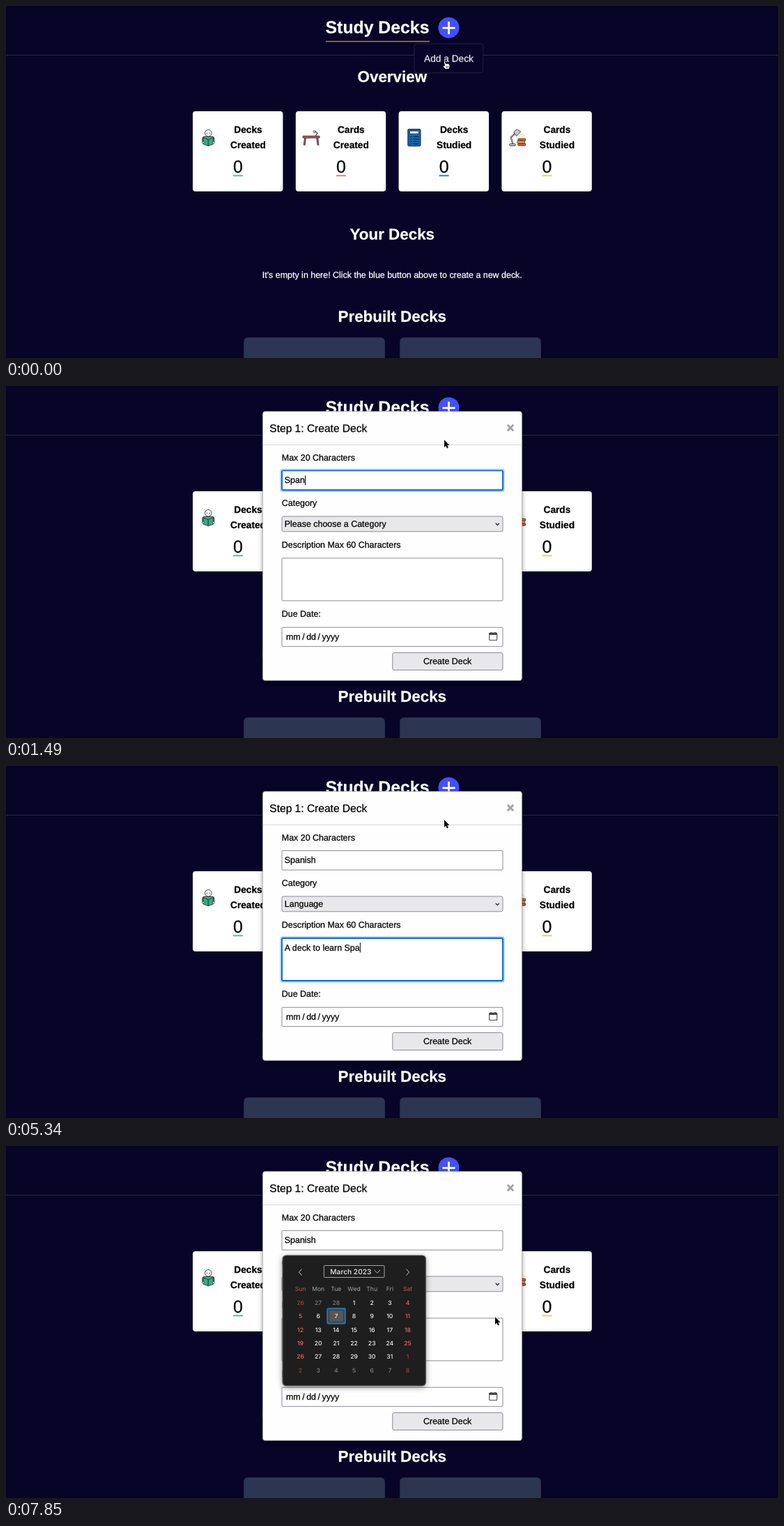
Write an HTML page with a canvas that moves like this. It is 1108 px wide and 505 px high and loops after 8 s.

```html
<!DOCTYPE html>
<html lang="en">
<head>
<meta charset="utf-8">
<title>Study Decks</title>
<style>
html, body { margin: 0; width: 100%; height: 100%; overflow: hidden; background: #070428; }
canvas { display: block; }
</style>
</head>
<body>
<canvas id="stage" width="1108" height="505"></canvas>
<script>
const W = 1108, H = 505, LOOP = 8000;
const ARIAL = '"Liberation Sans", Arial, sans-serif';
const INTER = 'Inter, sans-serif';
const BG = '#070428', BASE = 12.45, INK = '#35323c';
const screen = document.getElementById('stage').getContext('2d');
const layer = document.createElement('canvas');
layer.width = W;
layer.height = H;
const sheet = layer.getContext('2d');
let c = screen;

// The screen advances in even beats; every event falls on one.
const BEAT = 148.2, LEAD = 5;
const AT = { open: 3, name: 7, select: 13, menu: 15, hover: 16, picked: 20, note: 21,
  write: 23, finish: 36, date: 43, blur: 50, calendar: 52, drift: 53 };

const clamp = (v, lo, hi) => Math.min(hi, Math.max(lo, v));

function typed(str, beat, first, rate, lag = 0) {
  const keys = beat < first ? 0 : Math.floor((beat - first + 1) * rate - lag);
  return str.slice(0, keys);
}

// CSS "ease": cubic-bezier(.25, .1, .25, 1)
function ease(x) {
  const curve = (a, b, u) => 3 * a * u * (1 - u) ** 2 + 3 * b * u * u * (1 - u) + u ** 3;
  let lo = 0, hi = 1;
  for (let i = 0; i < 24; i++) {
    const mid = (lo + hi) / 2;
    if (curve(.25, .25, mid) < x) lo = mid; else hi = mid;
  }
  return curve(.1, 1, lo);
}

function text(str, x, y, { size = BASE, color = '#000', align = 'left', weight = 400, font = ARIAL } = {}) {
  c.font = `${weight} ${size}px ${font}`;
  c.textRendering = 'geometricPrecision';
  c.textAlign = align;
  c.fillStyle = color;
  c.fillText(str, x, y);
  if (font !== ARIAL) return;
  // A hairline gives the fuller weight of smoothed type.
  c.strokeStyle = color;
  c.lineWidth = .25;
  c.strokeText(str, x, y);
}

function paint(fill, stroke, width = 1) {
  if (fill) { c.fillStyle = fill; c.fill(); }
  if (stroke) { c.strokeStyle = stroke; c.lineWidth = width; c.stroke(); }
}

function box(x, y, w, h, r, fill, stroke, width) {
  c.beginPath();
  c.roundRect(x, y, w, h, r);
  paint(fill, stroke, width);
}

function rect(x, y, w, h, color) {
  c.fillStyle = color;
  c.fillRect(x, y, w, h);
}

function poly(points, fill, stroke, width) {
  c.beginPath();
  points.forEach(([x, y]) => c.lineTo(x, y));
  c.closePath();
  paint(fill, stroke, width);
}

function line(points, color, width) {
  c.beginPath();
  points.forEach(([x, y]) => c.lineTo(x, y));
  paint(null, color, width);
}

function chevron(x, y, w, h, color, width) {
  line([[x - w, y - h], [x, y + h], [x + w, y - h]], color, width);
}

function disc(x, y, r, fill, stroke, width) {
  c.beginPath();
  c.arc(x, y, r, 0, Math.PI * 2);
  paint(fill, stroke, width);
}

function local(x, y, draw) {
  c.save();
  c.translate(x, y);
  draw();
  c.restore();
}

function shadow(blur, alpha, draw) {
  c.save();
  c.shadowBlur = blur;
  c.shadowOffsetY = 2;
  c.shadowColor = `rgba(0,0,0,${alpha})`;
  draw();
  c.restore();
}

// Card icons are drawn around their own centre.
function readerIcon() {
  const green = '#2fb27c';
  box(-8.5, -1.5, 17, 10, 3, green, INK);
  disc(0, -6.5, 4.8, '#fff', INK, .9);
  for (const side of [-1, 1]) {
    disc(side * 1.8, -6.5, .7, INK);
    poly([[0, 3], [side * 7, 0], [side * 7, 9.5], [0, 12]], green, INK, .9);
    disc(side * 7.5, 7, 1.4, '#fff', INK, .8);
  }
}

function deskIcon() {
  const wood = '#c4574a';
  for (const side of [-1, 1]) line([[side * 8.5, 0], [side * 10, 11]], INK, 2.8);
  for (const side of [-1, 1]) line([[side * 8.5, 0], [side * 10, 10.5]], wood, 1.2);
  box(-12, -2.3, 24, 2.8, .5, wood, INK, .9);
  line([[6, -3], [9, -6], [5.5, -9.5]], INK, 1.1);
  disc(4.5, -8.5, 1.5, '#ddd', INK, .8);
}

function listIcon() {
  box(-9, -12, 18, 24, 1.5, '#1768b3', '#142c4c', 1.2);
  box(-6.5, -9.5, 13, 4, 0, '#f2f7fc', '#142c4c', .8);
  for (let y = -1.5; y < 10; y += 3.5) {
    line([[-6.5, y], [-5, y + 1], [-3.5, y - 1]], '#0d2747', 1);
    line([[-1.5, y], [6.5, y]], '#0d2747', 1.2);
  }
}

function lampIcon() {
  disc(6, -1, 5, '#fff1c4');
  for (const [color, width] of [[INK, 2.2], ['#d6d6dc', .9]])
    line([[-6, 10], [-9, 0], [-2, -7]], color, width);
  poly([[-5, -8], [-.5, -12], [5, -8.5], [-1, -2]], '#c9c9d0', INK, .9);
  box(-11, 9, 8.5, 2.8, 1, '#c9c9d0', INK, .9);
  for (let i = 0; i < 3; i++)
    box(1 - i % 2, 1.5 + i * 3.4, 11, 3.2, 1, i % 2 ? '#f5b832' : '#e0533d', INK, .8);
}

const CARDS = [
  ['Decks', 'Created', '#3dbb91', readerIcon],
  ['Cards', 'Created', '#ee6f64', deskIcon],
  ['Decks', 'Studied', '#1d74c0', listIcon],
  ['Cards', 'Studied', '#f9c54a', lampIcon]
];

function card([top, low, color, icon], i) {
  const label = { size: 13.69, weight: 700, align: 'center' };
  local(268 + i * 147.8, 151, () => {
    box(0, 0, 129.4, 115, 4, '#fff');
    text(top, 79.5, 31.3, label);
    text(low, 79.5, 53, label);
    text('0', 65, 88, { size: 24.9, align: 'center' });
    rect(58, 91.5, 14, 1.8, color);
    local(22.3, 37.8, icon);
  });
}

function page() {
  rect(0, 0, W, H, BG);
  rect(0, 70, W, 1, '#29293a');
  const mid = 554.3;
  const head = { size: 22.4, weight: 700, color: '#fff', align: 'center' };
  text('Study Decks', 533, 39, { ...head, size: 24.8 });
  rect(459, 50, 149, 1.5, '#b3871a');
  disc(635.5, 31.2, 15, '#4450fb');
  rect(626.5, 30.1, 18, 2.8, '#fff');
  rect(634.1, 22.5, 2.8, 18, '#fff');
  text('Overview', mid, 109.3, head);
  text('Your Decks', mid, 335, head);
  text('Prebuilt Decks', mid, 453, head);
  text("It's empty in here! Click the blue button above to create a new deck.", mid, 390.3,
    { color: '#fff', align: 'center' });
  CARDS.forEach(card);
  for (const x of [341.3, 565.3]) box(x, 475.4, 202.5, 60, 6, '#2c3652');
}

function tooltip() {
  box(586, 54, 98.8, 42, 4, BG, '#22213a');
  text('Add a Deck', 635.5, 79.8, { size: 13.69, color: '#e9e9ee', align: 'center' });
}

function field(y, h, focused, fill = '#fff', r = 1) {
  box(396, y, 317, h, r, fill, '#8b8b98');
  if (!focused) return;
  box(394.2, y - 1.8, 320.6, h + 3.6, 3, null, '#a9d0fa', 1.8);
  box(396, y, 317, h, 1.5, null, '#0a68de', 1.9);
}

function entry(str, y, caret) {
  text(str, 399.8, y);
  if (caret) rect(400 + c.measureText(str).width, y - 11, 1, 14, '#000');
}

function dateField(focused) {
  field(346.3, 27.4, focused);
  if (focused) rect(401, 352.5, 23.5, 14.5, '#b0d5fb');
  let x = 402;
  for (const part of ['mm', '/', 'dd', '/', 'yyyy']) {
    text(part, x, 364.2);
    x += c.measureText(part).width + 2.5;
  }
  local(693, 353, () => {
    box(.7, 1.4, 11, 10.4, 1, null, '#444', 1.1);
    rect(.4, 1.4, 11.6, 2.6, '#444');
    for (const x of [2.6, 8.4]) rect(x, 0, 1.3, 2, '#444');
  });
}

function modal(beat) {
  shadow(6, .4, () => box(368.3, 36.3, 372.4, 386.4, 4, '#fefefe'));
  box(368.3, 36.3, 372.4, 386.4, 4, null, 'rgba(90,90,100,.45)', .9);
  rect(368.8, 84, 371.4, 1, '#d9d9dc');
  text('Step 1: Create Deck', 378.3, 65.7, { size: 15.56 });
  for (const s of [-4.2, 4.2]) line([[724 - s, 55.8], [724 + s, 64.2]], '#a3a3a3', 3);
  text('Max 20 Characters', 395.8, 107);
  text('Category', 395.8, 172.3);
  text('Description Max 60 Characters', 395.8, 232);
  text('Due Date:', 395.8, 331.4);

  const onName = beat < AT.select;
  field(121.4, 27.8, onName);
  entry(typed('Spanish', beat, AT.name, 1.2), 139.4, onName);

  field(187, 21.8, beat >= AT.select && beat < AT.note, '#e8e8ea', 2.5);
  text(beat < AT.picked ? 'Please choose a Category' : 'Language', 399.8, 202.3);
  chevron(705.3, 198.3, 2.5, 1.3, '#222', 1.2);

  const onNote = beat >= AT.note && beat < AT.date;
  field(247, 61, onNote);
  const note = typed('A deck to learn Sp', beat, AT.write, 1.82, .5) + typed('anish', beat, AT.finish, 1);
  entry(note, 264.5, onNote);

  dateField(beat >= AT.date && beat < AT.blur);
  box(554.8, 382.6, 158.2, 25, 2.5, '#e8e8ea', '#8b8b98');
  text('Create Deck', 633.6, 399.4, { align: 'center' });
}

function options(beat) {
  const row = 17.8, picked = beat < AT.hover ? 0 : 1;
  shadow(9, .35, () => box(396.3, 182.2, 316, 62.4, 4.5, '#e8e9eb'));
  box(396.3, 182.2, 316, 62.4, 4.5, null, '#c3c4c8', .8);
  rect(396.8, 186.8 + picked * row, 314.8, row, '#3d8eef');
  ['Please choose a Category', 'Language', 'Math'].forEach((name, i) =>
    text(name, 413.5, 200.2 + i * row, { size: 12.55, color: i === picked ? '#fff' : '#111' }));
  line([[401.5, 196.5], [404, 199.7], [408.8, 191.5]], picked ? '#111' : '#fff', 1.4);
}

function calendar() {
  const left = 422.5, colW = 25.67, rowH = 19.42;
  const label = { size: 8.6, weight: 500, align: 'center', font: INTER };
  const weekend = col => col % 6 === 0;
  shadow(9, .45, () => box(397, 157, 205.4, 187, 5, '#1e1e1e'));
  box(397, 157, 205.4, 187, 5, null, '#5b5b5d', 1.2);
  for (const [x, dir] of [[left, 1], [left + 6 * colW, -1]])
    line([[x + 2 * dir, 176.5], [x - 2 * dir, 181], [x + 2 * dir, 185.5]], '#a0a0a0', 1.1);
  box(456.4, 171.5, 86.6, 17, 1, null, '#a5a5a5');
  text('March 2023', 465.3, 183.6, { ...label, size: 10.2, align: 'left', color: '#e8e8e8' });
  chevron(532.8, 180.1, 4.3, 2.1, '#b5b5b5', 1);
  box(461.2, 233.2, 25.6, 21.4, 1.5, '#555658', '#1b6fae', 2.2);
  box(463.3, 235.3, 21.4, 17.2, 1, null, '#2b2b2b', .8);

  ['Sun', 'Mon', 'Tue', 'Wed', 'Thu', 'Fri', 'Sat'].forEach((day, col) =>
    text(day, left + col * colW, 208.4, { ...label, weight: 400, color: weekend(col) ? '#c4524d' : '#a2a2a2' }));
  // The grid opens on 26 February.
  for (let i = 0; i < 42; i++) {
    const date = new Date(2023, 1, 26 + i), col = i % 7;
    const shades = weekend(col) ? ['#9c423f', '#fb5f58'] : ['#7c7c7c', '#f2f2f2'];
    const color = shades[date.getMonth() === 2 ? 1 : 0];
    text(date.getDate(), left + col * colW, 227.7 + Math.floor(i / 7) * rowH, { ...label, color });
  }
}

function hand() {
  c.lineJoin = 'round';
  poly([[2, 1], [4, .6], [5, 4.4], [10.4, 5], [11, 8.5], [9.8, 12.5], [4.6, 12.8], [.4, 8], [3.6, 7.8]],
    '#fff', '#15151c');
  for (const x of [6, 8]) line([[x, 8], [x + .3, 11]], '#15151c', .8);
}

function arrow() {
  c.lineJoin = 'round';
  poly([[0, 0], [0, 10.6], [2.4, 8.5], [4, 12.1], [5.8, 11.3], [4.3, 7.8], [7.5, 7.6]], '#000', '#fff', 1.6);
  c.fill();
}

function pointer(beat) {
  if (beat < AT.open) return local(626, 78, hand);
  if (beat >= AT.drift) return local(702, 245.3, arrow);
  const u = clamp((beat - AT.date) / 5, 0, 1);
  const p = u * u * (3 - 2 * u);
  local(629 + 72 * p, 77.3 + 277.7 * p, arrow);
}

function dialog(beat) {
  const p = ease(clamp((beat - 2.81) / 2.7, 0, 1));
  c = sheet;
  c.clearRect(0, 0, W, H);
  modal(beat);
  c = screen;
  c.globalAlpha = p;
  c.drawImage(layer, 0, Math.round(-246 * (1 - p)));
  c.globalAlpha = 1;
}

function draw(now) {
  const beat = Math.floor((now % LOOP + LEAD) / BEAT);
  page();
  if (beat < AT.open) tooltip(); else dialog(beat);
  if (beat >= AT.menu && beat < AT.picked) options(beat);
  if (beat >= AT.calendar) calendar();
  pointer(beat);
}

const start = performance.now();
function tick() {
  draw(performance.now() - start);
  requestAnimationFrame(tick);
}
tick();
</script>
</body>
</html>
```
